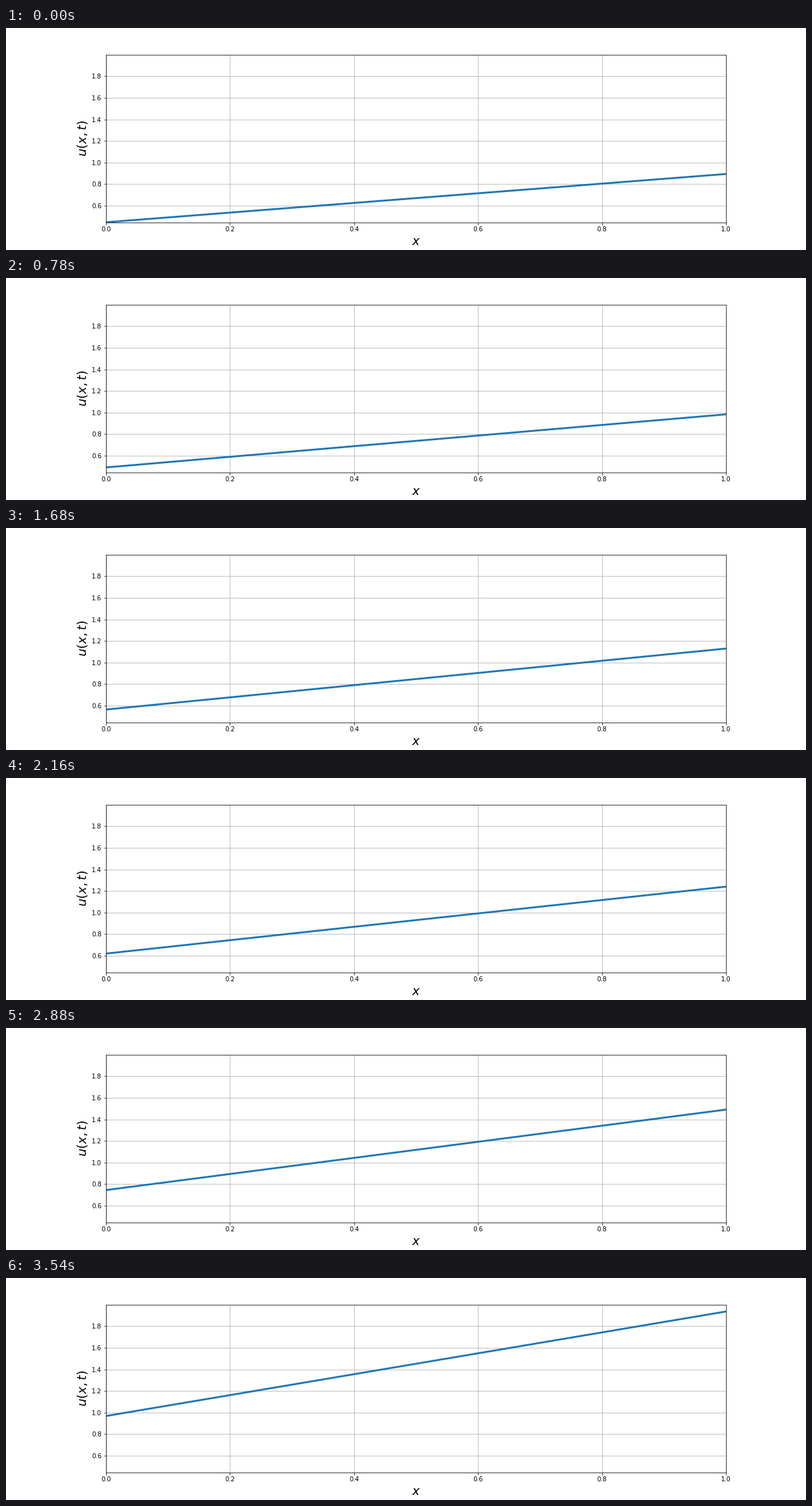
A matplotlib script that plays this animation: 1280x356 px, repeating every 3600 ms.

```python
import matplotlib.pyplot as plt
import numpy as np
from matplotlib.animation import FuncAnimation

WIDTH, HEIGHT, DPI = 1280, 356, 72
FRAMES, INTERVAL = 60, 60

plt.rcParams["font.family"] = "DejaVu Sans"


def solution(x, t):
    """Straight profile whose slope steepens as t goes from 0 to 1."""
    return (1 + x) / np.sqrt(5 - 4 * t)


x = np.linspace(0, 1, 81)

fig = plt.figure(figsize=(WIDTH / DPI, HEIGHT / DPI), dpi=DPI, facecolor="white")
fig.subplots_adjust(left=0.125, right=0.9, bottom=0.125, top=0.88)
ax = fig.add_subplot()
ax.set_xlim(0, 1)
ax.set_ylim(solution(0, 0), solution(1, 1))
ax.set_xticks(np.arange(0, 1.1, 0.2))
ax.set_yticks(np.arange(0.6, 1.9, 0.2))
ax.set_xlabel("$x$", fontsize=20)
ax.set_ylabel("$u(x,t)$", fontsize=20)
ax.grid(True, color="#b0b0b0", linewidth=0.8)
line, = ax.plot(x, solution(x, 0), color="#1f77b4", linewidth=3)


def update(frame):
    line.set_ydata(solution(x, frame / FRAMES))
    return line,


anim = FuncAnimation(fig, update, frames=FRAMES, interval=INTERVAL,
                     repeat=True, repeat_delay=0)
plt.show()
```
